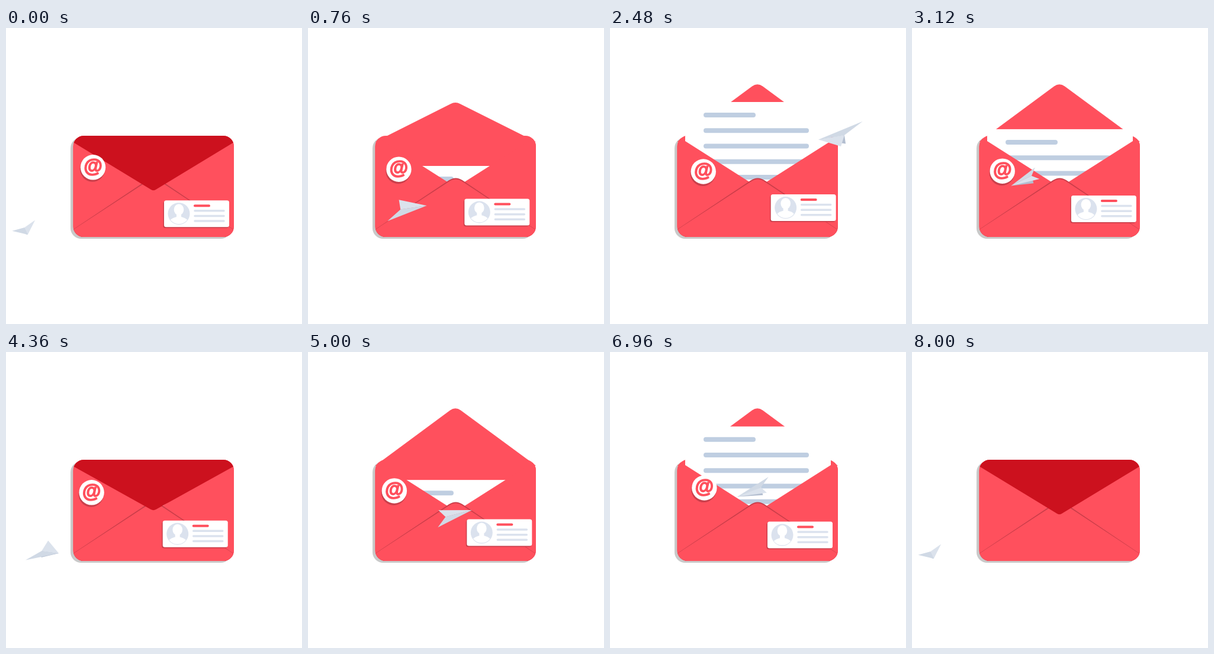
Animation of 500x500 px, one loop 8.04 s. Source, as an HTML page:

```html
<!DOCTYPE html>
<html lang="en">
<head>
<meta charset="utf-8">
<title>Mail</title>
<style>
  html, body { margin: 0; width: 100%; height: 100%; overflow: hidden; background: #fff; }
  svg { display: block; width: 100%; height: 100%; }
  .red { fill: #ff505d; }
  .line { fill: none; stroke-linecap: round; }
  .at {
    font: bold 32.5px "Liberation Sans", Arial, sans-serif; text-anchor: middle;
    fill: #ff505d; stroke: #ff505d; stroke-width: 1.5;
  }
</style>
</head>
<body>
<svg viewBox="0 0 500 500">
  <defs>
    <clipPath id="bodyClip"><rect x="113.5" y="182" width="271.5" height="171" rx="18"/></clipPath>
    <clipPath id="letterClip"><rect x="100" y="80" width="300" height="262"/></clipPath>
    <clipPath id="avatarClip"><circle cx="25" cy="22.5" r="17.5"/></clipPath>
  </defs>

  <rect x="109" y="185" width="271.5" height="171" rx="18" fill="#c9c9c9"/>
  <path id="flapOpen" class="red"/>
  <rect class="red" x="113.5" y="182" width="271.5" height="171" rx="18"/>

  <g clip-path="url(#letterClip)">
    <g id="letter">
      <rect x="127" y="125" width="246" height="220" fill="#fff"/>
      <path class="line" stroke="#bfcee1" stroke-width="8"
        d="M162 147H242M162 173.300H332M162 199.500H332M162 225.700H332M162 252H332"/>
    </g>
  </g>

  <g clip-path="url(#bodyClip)">
    <path class="red" d="M113 182.500L127 191L235.500 260L249.500 268L264.500 260L373 191L386 182.500V354H113Z"/>
    <path fill="#c93d49" d="M113 340.500L238 257.300Q249.500 249.500 261 257.300L386 341.500V354H113Z"/>
    <path class="red" d="M113 341L238 259.500Q249.500 251.700 261 259.500L386 342V354H113Z"/>
    <path id="flapClosed" fill="#cc111e"/>
  </g>

  <g id="plane">
    <path id="keel" fill="#b3bed0"/>
    <path id="leftWing" fill="#dbe2ec"/>
    <path id="rightWing" fill="#d0d9e5"/>
  </g>

  <g id="badge">
    <circle cx="-1" cy="3.500" r="21" fill="#cb3f4b"/>
    <circle r="21.200" fill="#fff"/>
    <text class="at" y="8.500">@</text>
  </g>

  <g id="card">
    <rect x="-1.500" y="1.700" width="110" height="45" rx="3.500" fill="#cb3f4b"/>
    <rect width="110" height="45" rx="3.500" fill="#fff"/>
    <circle cx="25" cy="22.500" r="18.500" fill="#dbe2ee"/>
    <g fill="#fff" clip-path="url(#avatarClip)">
      <ellipse cx="25" cy="15.500" rx="8.300" ry="9.500"/>
      <rect x="21" y="20" width="8" height="10"/>
      <path d="M8 40Q8 31 20 28H30Q42 31 42 40Z"/>
    </g>
    <path class="line" stroke="#ff505d" stroke-width="4" d="M52 9H76"/>
    <path class="line" stroke="#dbe2ee" stroke-width="3.500" d="M52 17.500H101M52 26.200H101M52 34.700H101"/>
  </g>
</svg>

<script>
const LOOP = 8040, FLOAT = 8000, CYCLE = 4000;
const { sin, cos, PI } = Math;
const el = id => document.getElementById(id);

function ease(t, start, duration) {
  const x = Math.min(1, Math.max(0, (t - start) / duration));
  return x * x * (3 - 2 * x);
}

// Cosine that reaches 1 at the peak time
const wave = (t, peak, period) => cos(2 * PI * (t - peak) / period);

function drawFlap(t) {
  const open = ease(t, 283, 650) - ease(t, 3300, 650);
  const apex = 275.5 - 183.5 * open;
  const base = 193 - open;
  const w = 4 + 5 * open, dy = (apex - base) * w / 136;
  const tip = `L${249 - w} ${apex - dy}Q249 ${apex} ${249 + w} ${apex - dy}L385 ${base}`;
  const facing = apex > base;
  el('flapClosed').setAttribute('d', facing ? `M113.5 182V${base}${tip}V182Z` : '');
  el('flapOpen').setAttribute('d', facing ? '' : `M113.5 ${base}${tip}Z`);
}

// The plane circles on a tilted orbit and turns once per cycle
function drawPlane(t) {
  const u = t / CYCLE;
  const orbit = 2 * PI * u + 0.05;
  const x = 238 - 205 * cos(orbit);
  const y = 257 + 83.4 * cos(orbit) + 21.5 * sin(orbit);

  const turn = (277 + 360 * u + 20 * sin(PI * u) - 10 * sin(2 * PI * u)) * PI / 180;
  const c = cos(turn), s = sin(turn);
  const heading = [58 * c, 1 - 13 * c - 16 * s];
  const span = [18 * c - 45 * s - 8, 3 - 36 * c + 17 * s];
  const point = (along, across, drop = 0) => [
    x + along * heading[0] + across * span[0],
    y + along * heading[1] + across * span[1] + drop
  ];
  const nose = point(0.5, 0), spine = point(-0.28, 0), keel = point(-0.35, 0.05, 13);
  const shape = (id, corner) => el(id).setAttribute('d', `M${nose}L${spine}L${corner}Z`);
  shape('keel', keel);
  shape('leftWing', point(-0.5, 0.5));
  shape('rightWing', point(-0.5, -0.5));
}

function move(id, x, y) {
  el(id).setAttribute('transform', `translate(${x} ${y})`);
}

function drawFloating(t) {
  move('badge', 152 - 7.5 * wave(t, 4500, 5200), 236 + 6.5 * wave(t, 2400, 9000));
  move('card', 268 + 3.7 * wave(t, 2400, 3400), 284.7 + 3 * wave(t, 0, 8000) + 3.5 * wave(t, 0, 4000));
  for (const id of ['badge', 'card']) el(id).style.display = t < FLOAT ? '' : 'none';
}

function render(now) {
  const t = now % LOOP, c = t % CYCLE;
  drawFlap(c);
  move('letter', 0, 108 * (1 - ease(c, 900, 400) + ease(c, 2940, 400)));
  drawPlane(c);
  drawFloating(t);
}

let start;
function tick(now) {
  start ??= now;
  render(now - start);
  requestAnimationFrame(tick);
}
render(0);
requestAnimationFrame(tick);
</script>
</body>
</html>
```
